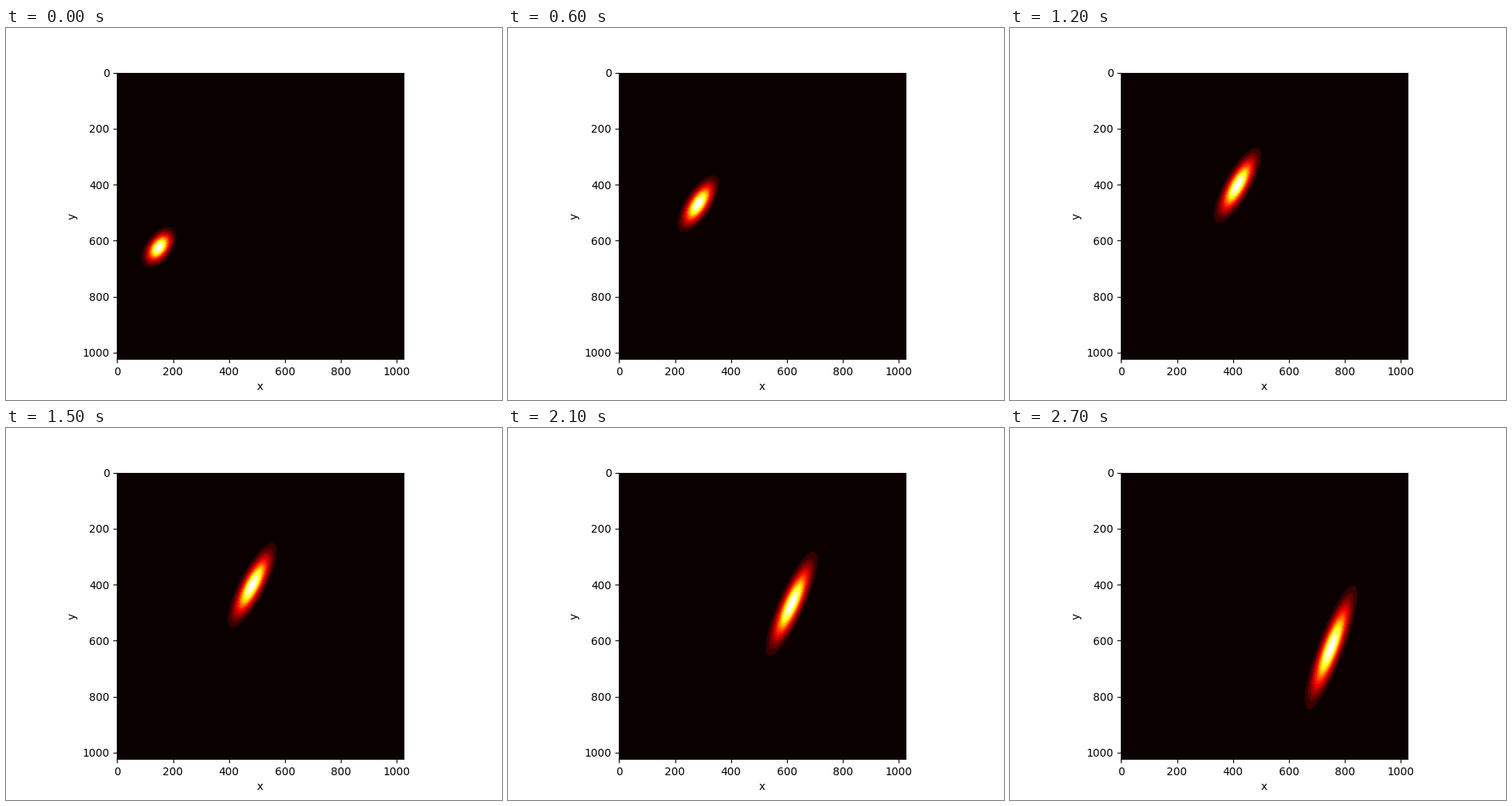
Recreate the animation shown at these times as a matplotlib script. Size 640 by 480 pixels, loop 3 s.

```python
import numpy as np
import matplotlib.pyplot as plt
from matplotlib.animation import FuncAnimation

SIZE = 1024
FRAMES = 10
MINOR = 20

fig, ax = plt.subplots(figsize=(6.4, 4.8), dpi=100)
cols, rows = np.meshgrid(np.arange(SIZE), np.arange(SIZE))


def spot(frame):
    """Tilted Gaussian that stretches while it follows a parabola."""
    progress = frame / (FRAMES - 1)
    cx = 150 + 600 * progress
    cy = 400 + (cx - 450) ** 2 / 400
    major = 35 + 65 * progress
    angle = 0.3 * np.pi + 0.03 * frame
    dx, dy = cols - cx, cy - rows
    along = dx * np.cos(angle) + dy * np.sin(angle)
    across = dy * np.cos(angle) - dx * np.sin(angle)
    return np.exp(-0.5 * ((along / major) ** 2 + (across / MINOR) ** 2))


image = ax.imshow(spot(0), cmap=plt.get_cmap("hot", 16), vmin=0, vmax=1)
ax.set_xlabel("x")
ax.set_ylabel("y")


def update(frame):
    image.set_data(spot(frame))
    return (image,)


anim = FuncAnimation(fig, update, frames=FRAMES, interval=300, repeat=True, repeat_delay=0)
plt.show()
```
